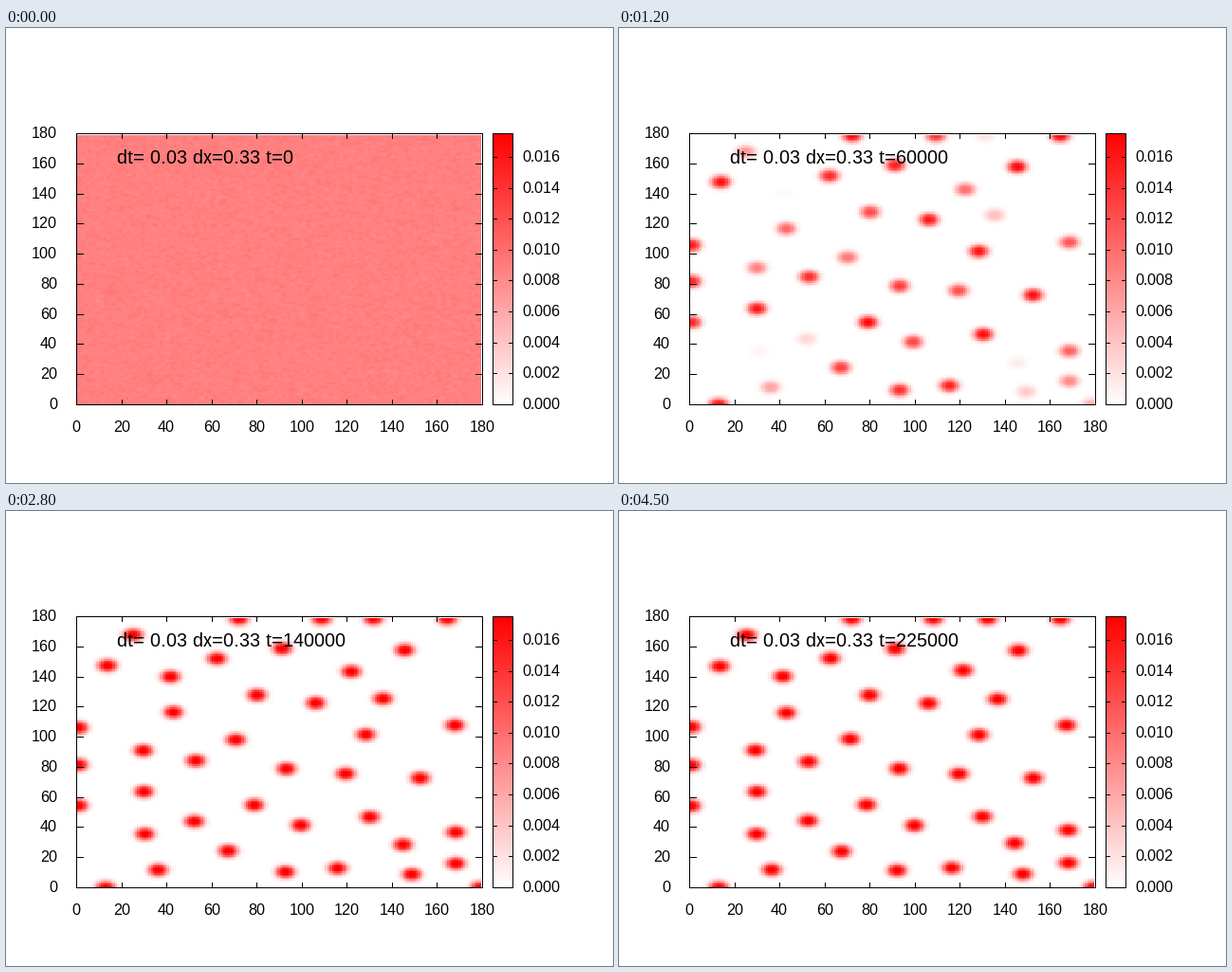
Write a matplotlib script that moves like this. It is 640 by 480 pixels and loops after 4600 ms.

```python
import numpy as np
import matplotlib.pyplot as plt
from matplotlib.animation import FuncAnimation
from matplotlib.colors import LinearSegmentedColormap

W, H, DPI = 640, 480, 80
PX = 72 / DPI                       # points per pixel
LEFT, RIGHT, TOP, BOTTOM = 74, 502, 111, 397
BAR_L, BAR_R = 513, 534
SIZE, VMAX = 180, 0.01753
FRAMES, STEP = 46, 5000
GROWTH, PEAK, RADIUS = 1.5, 0.018, 4.3
SETTLED = 14                        # frame from which the spots drift

# Seeds of the spots, earliest to grow first
SEEDS = np.array([
    (145, 158), (164, 179), (79, 55), (130, 47), (72, 179), (152, 73),
    (13, 0), (14, 148), (128, 102), (30, 64), (106, 123), (1, 106),
    (91, 159), (115, 13), (1, 82), (1, 55), (62, 152), (53, 85),
    (93, 10), (109, 179), (93, 79), (67, 25), (99, 42), (80, 128),
    (119, 76), (168, 108), (168, 36), (43, 117), (122, 143), (70, 98),
    (30, 91), (168, 16), (25, 168), (36, 12), (178, 0), (135, 126),
    (149, 9), (52, 44), (131, 179), (145, 28), (31, 36), (42, 140),
], float)

plt.rcParams.update({
    "font.family": "Liberation Sans",
    "text.hinting": "native",
    "text.hinting_factor": 1,
})
REDS = LinearSegmentedColormap.from_list("reds", ["white", "red"])

fig = plt.figure(figsize=(W / DPI, H / DPI), dpi=DPI, facecolor="white")
ax = fig.add_axes([0, 0, 1, 1])
ax.axis("off")


def px(v):
    return round(LEFT + v * (RIGHT - LEFT) / SIZE)


def py(v, top=SIZE):
    return round(BOTTOM - v * (BOTTOM - TOP) / top)


def line(xs, ys):
    ax.plot(np.add(xs, 0.5), np.add(ys, 0.5), color="black", lw=PX,
            snap=False, solid_capstyle="projecting",
            solid_joinstyle="miter", zorder=3)


def box(l, r):
    line([l, r, r, l, l], [TOP, TOP, BOTTOM, BOTTOM, TOP])


def label(x, y, s, size=16, ha="left"):
    return ax.text(x, y, s, size=size * PX, ha=ha, va="baseline",
                   color="black", zorder=4)


def image(data, l, r, t):
    return ax.imshow(data, cmap=REDS, vmin=0, vmax=VMAX, origin="lower",
                     extent=(l, r + 1, BOTTOM + 1, t),
                     interpolation="nearest", aspect="auto", zorder=1)


def noise():
    a = np.random.default_rng(4).uniform(0.0079, 0.0096, (SIZE, SIZE))
    return (a[1:, 1:] + a[:-1, 1:] + a[1:, :-1] + a[:-1, :-1]) / 4


def push(gap):
    """Repulsion along each gap vector, fading with distance."""
    d = np.linalg.norm(gap, axis=-1, keepdims=True) + 1e-9
    return np.where(d > 5, 2.2 * np.exp((20 - d) / 4) * gap / d, 0)


def drift(p):
    """Spots repel each other and their own mirror images in the walls."""
    move = push(p[:, None] - p).sum(axis=1)
    for axis in np.eye(2):
        for wall in (0, SIZE - 1):
            move += push(2 * (p - wall) * axis)
    return move


# Growth is staggered by rank, with a few late stragglers
rank = np.linspace(0, 1, len(SEEDS))
half_time = 10 + 2.6 * rank + 1.8 * rank ** 8
DRIFT = drift(SEEDS)
CELLS = np.arange(SIZE - 1) + 0.5


def field(n):
    if n == 0:
        return noise()
    k = max(0, n - SETTLED) / (FRAMES - 1 - SETTLED)
    x, y = np.clip(SEEDS + k * DRIFT, 0.4, SIZE - 1.4).T[:, :, None]
    amp = PEAK / (1 + np.exp(-GROWTH * (n - half_time)))
    r = np.hypot((CELLS - x)[:, None, :], (CELLS - y)[:, :, None])
    return np.tensordot(amp, np.exp(-(r / RADIUS) ** 2.7), 1)


heat = image(field(0), LEFT, px(SIZE - 1), py(SIZE - 1))
image(np.linspace(0, VMAX, 256)[:, None], BAR_L, BAR_R, TOP)

box(LEFT, RIGHT)
box(BAR_L, BAR_R)
for v in range(0, SIZE + 1, 20):
    x, y = px(v), py(v)
    line([x, x], [BOTTOM - 5, BOTTOM])
    line([x, x], [TOP, TOP + 5])
    line([LEFT, LEFT + 7], [y, y])
    line([RIGHT - 7, RIGHT], [y, y])
    label(x, 426, str(v), ha="center")
    label(54, y + 5, str(v), ha="right")
for i in range(9):
    v = i * 0.002
    y = py(v, VMAX)
    line([BAR_L, BAR_L + 4], [y, y])
    line([BAR_R - 4, BAR_R], [y, y])
    label(544, y + 5, f"{v:.3f}")
caption = label(117, 143, "", size=20)

ax.set_xlim(0, W)
ax.set_ylim(H, 0)


def update(n):
    heat.set_data(field(n))
    caption.set_text(f"dt= 0.03 dx=0.33 t={n * STEP}")
    return heat, caption


anim = FuncAnimation(fig, update, frames=FRAMES, interval=100,
                     repeat=True, repeat_delay=0, blit=False)
plt.show()
```
